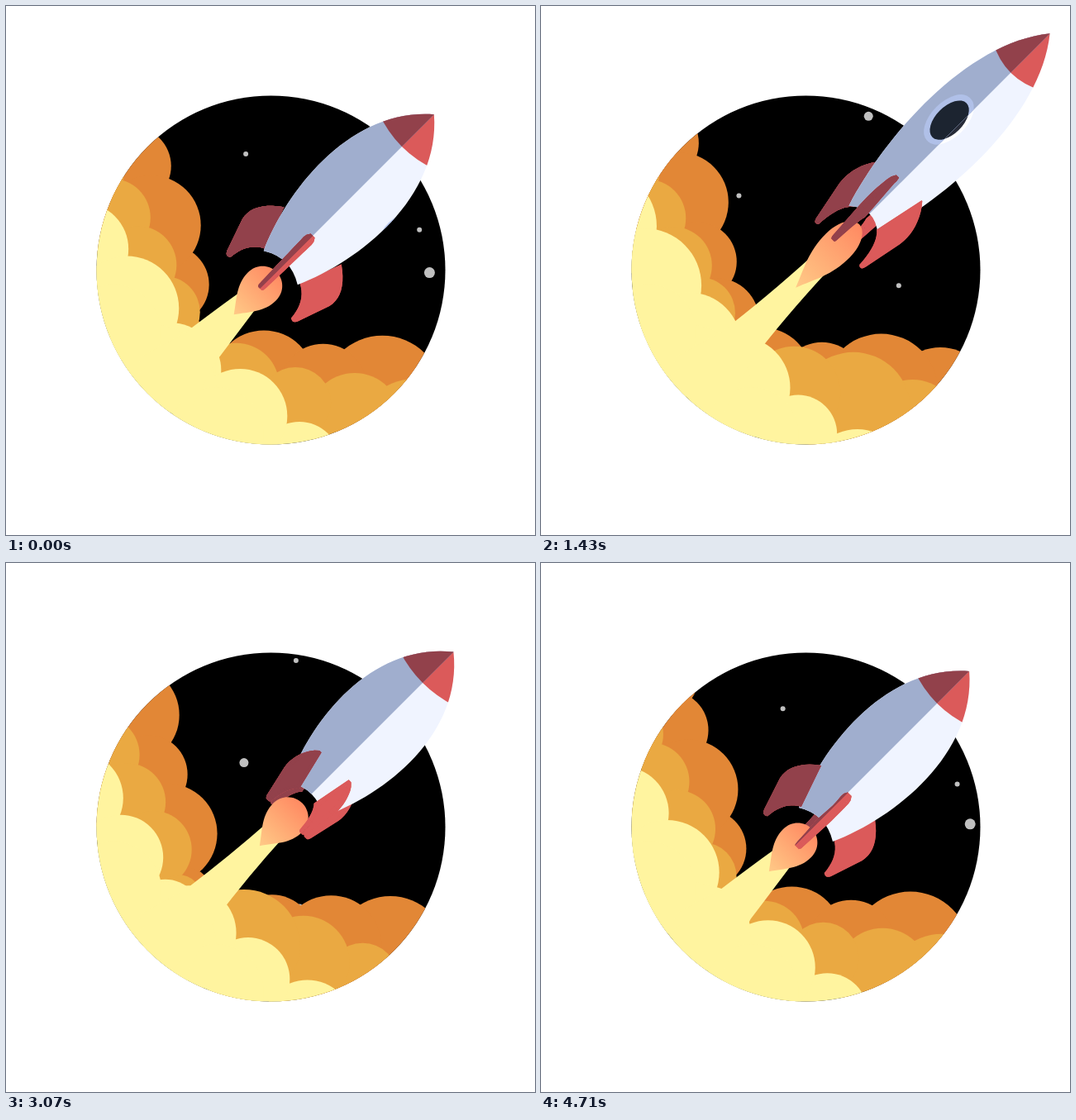
Write an HTML page with a canvas that moves like this. It is 640 px wide and 640 px high and loops after 4780 ms.

```html
<!DOCTYPE html>
<html lang="en">
<head>
<meta charset="utf-8">
<title>Rocket launch</title>
<style>
html, body { margin: 0; width: 100%; height: 100%; overflow: hidden; background: #fff; }
canvas { display: block; width: 640px; height: 640px; }
</style>
</head>
<body>
<canvas id="stage" width="640" height="640"></canvas>
<script>
const ctx = document.getElementById('stage').getContext('2d');
const LOOP = 4.78;
const STEPS = 67;
const TICK = LOOP / STEPS;
const TAU = Math.PI * 2;
const AXIS = 649;          // the rocket flies along x + y = AXIS
const LENGTH = 262.6;

const LIGHT = { body: '#f0f4ff', trim: '#db5a5a', ring: '#ffffff', glass: '#282c38' };
const DARK = { body: '#a0aece', trim: '#92414b', ring: '#b0c0e8', glass: '#1c2430' };
const YELLOW = '#fff49f';

// Turning points of the flight: x of the nose tip and stretch of the hull.
const FLIGHT = [
  { at: 0.88, tip: 463, stretch: 0.81 },
  { at: 1.5, tip: 621, stretch: 1.23 },
  { at: 2.35, tip: 518, stretch: 0.86 },
  { at: 3.6, tip: 556, stretch: 1.02 },
  { at: 4.75, tip: 518, stretch: 1 }
];

// Each cloud layer sends out a steady stream of puffs on both sides of the axis.
// Puff radii swell and shrink along the stream as a sine wave.
const PUFF_SPEED = 120;
const GROW_TIME = 0.7;
const CLOUDS = [
  { color: '#e28736', first: -0.1, x: 300,
    right: { count: 8, y: 452, rise: 0.12, radius: 61, swell: 11, waves: 3, phase: 0 },
    left: { count: 8, y: 447, rise: 0.32, radius: 54, swell: 6.5, waves: 4, phase: -TAU / 4 } },
  { color: '#eaa942', first: 0.18, x: 300,
    right: { count: 8, y: 466, rise: 0.28, radius: 56, swell: 13, waves: 2, phase: 0 },
    left: { count: 10, y: 470, rise: 0.55, radius: 47, swell: 0, waves: 0, phase: 0 } },
  { color: YELLOW, first: 0.32, x: 250,
    right: { count: 8, y: 470, rise: 0.78, radius: 56, swell: 9, waves: 3, phase: 2.47 },
    left: { count: 8, y: 478, rise: 0.75, radius: 60, swell: 9.5, waves: 1, phase: 1.13 } }
];

// Stars drift down-left along lines of constant x + y.
const STARS = [
  { sum: 529.5, r: 5.5, enter: 0.5, x: 457.4, speed: 66 },
  { sum: 884, r: 3, enter: 1.5, x: 563.6, speed: 66 },
  { sum: 469, r: 3, enter: 2.6, x: 367.5, speed: 35.5 },
  { sum: 771, r: 3, enter: 4, x: 537, speed: 47.2 },
  { sum: 835, r: 6.5, enter: 4.3, x: 558, speed: 95 }
];

const wrap = t => (t % LOOP + LOOP) % LOOP;

// -1..1 triangle wave with the period and zeros of a sine
const triangle = angle => Math.asin(Math.sin(angle)) * 4 / TAU;

function flightPose(t) {
  const next = FLIGHT.findIndex(key => key.at > t);
  const b = FLIGHT[Math.max(next, 0)];
  const a = FLIGHT[(Math.max(next, 0) + FLIGHT.length - 1) % FLIGHT.length];
  const k = 0.5 - 0.5 * Math.cos(Math.PI * wrap(t - a.at) / wrap(b.at - a.at));
  const mix = name => a[name] + (b[name] - a[name]) * k;
  return { tip: mix('tip'), stretch: mix('stretch') };
}

function disk(x, y, r) {
  ctx.beginPath();
  ctx.arc(x, y, r, 0, TAU);
  ctx.fill();
}

// Runs a drawing as it is and mirrored across the flight axis.
function bothSides(paint) {
  paint('right');
  ctx.save();
  ctx.transform(0, -1, -1, 0, AXIS, AXIS);
  paint('left');
  ctx.restore();
}

function drawStream(t, cloud, { count, y, rise, radius, swell, waves, phase }) {
  for (let i = 0; i < count; i++) {
    const sinceStart = wrap(t - cloud.first - i * LOOP / count + GROW_TIME);
    const grown = 1 - (1 - Math.min(1, sinceStart / GROW_TIME)) ** 2;
    const travel = (sinceStart - GROW_TIME) * PUFF_SPEED;
    const size = radius + swell * Math.sin(TAU * waves * i / count + phase);
    disk(cloud.x + travel, y + rise * travel, size * grown);
  }
}

function drawClouds(t) {
  for (const cloud of CLOUDS) {
    ctx.fillStyle = cloud.color;
    bothSides(side => drawStream(t, cloud, cloud[side]));
  }
  disk(175, 465, 80);
  bothSides(() => disk(254, 519, 58));
}

function drawPlume(start) {
  ctx.fillStyle = YELLOW;
  ctx.beginPath();
  ctx.moveTo(start, -13);
  ctx.quadraticCurveTo(-60, -17, -125, -26);
  ctx.lineTo(-190, -45);
  ctx.lineTo(-190, 45);
  ctx.lineTo(-125, 25);
  ctx.quadraticCurveTo(-60, 16, start, 13);
  ctx.fill();
}

function drawFlame(top, length, half) {
  const tip = top - length;
  const at = k => tip + length * k;
  const glow = ctx.createLinearGradient(tip, 0, top, 0);
  glow.addColorStop(0, '#ffca87');
  glow.addColorStop(1, '#ff8a62');
  ctx.fillStyle = glow;
  ctx.beginPath();
  ctx.moveTo(tip, 0);
  ctx.bezierCurveTo(at(0.22), -half * 0.45, at(0.38), -half, at(0.66), -half);
  ctx.bezierCurveTo(at(0.87), -half, top, -half * 0.5, top, 0);
  ctx.bezierCurveTo(top, half * 0.5, at(0.87), half, at(0.66), half);
  ctx.bezierCurveTo(at(0.38), half, at(0.22), half * 0.45, tip, 0);
  ctx.fill();
}

// Points of a quadratic curve through start and end.
function curve([x0, y0], [x1, y1], [x2, y2], steps = 10) {
  return Array.from({ length: steps + 1 }, (_, i) => {
    const k = i / steps, j = 1 - k;
    return [j * j * x0 + 2 * j * k * x1 + k * k * x2, j * j * y0 + 2 * j * k * y1 + k * k * y2];
  });
}

// Fin outline: distance along the hull, distance from the axis.
const FIN = [
  ...curve([55, 49], [33, 80], [9, 74.5]),
  ...curve([-31, 60.5], [-38, 57.5], [-34, 52]),
  ...curve([-34, 52], [-7, 50], [3, 30])
];

function finThickness(x) {
  const round = (distance, size) => Math.sqrt(Math.min(1, Math.max(0, distance / size)));
  return (4.5 + (x + 35) / 36) * round(57 - x, 8) * round(x + 38, 5);
}

function fillPolygon(points) {
  ctx.beginPath();
  points.forEach(p => ctx.lineTo(...p));
  ctx.closePath();
  ctx.fill();
}

function drawFin(angle, tone) {
  const swing = triangle(angle);
  const edgeOn = 1 - Math.abs(swing);
  const face = sign => FIN.map(([x, r]) => [x, r * swing + sign * finThickness(x) * edgeOn]);
  const a = face(-1), b = face(1);
  ctx.fillStyle = tone.trim;
  fillPolygon(a);
  fillPolygon(b);
  a.forEach((p, i) => {
    const j = (i + 1) % a.length;
    fillPolygon([p, a[j], b[j], b[i]]);
  });
}

function drawWindow(angle, tone) {
  if (Math.cos(angle) <= 0) return;
  const swing = triangle(angle);
  const narrow = 1 - 0.4 * Math.abs(swing);
  const oval = (offset, rx, ry, color) => {
    ctx.fillStyle = color;
    ctx.beginPath();
    ctx.ellipse(131, 72 * swing + offset, rx, ry * narrow, 0, 0, TAU);
    ctx.fill();
  };
  oval(-2.5, 30, 26, DARK.ring);
  oval(0, 30, 26, tone.ring);
  oval(0, 24, 21, tone.glass);
}

function drawHull(angle, tone) {
  ctx.save();
  ctx.beginPath();
  ctx.moveTo(0, -29);
  ctx.bezierCurveTo(74, -62, 197, -76, LENGTH, 0);
  ctx.bezierCurveTo(197, 76, 74, 62, 0, 29);
  ctx.quadraticCurveTo(18, 0, 0, -29);
  ctx.clip();
  ctx.fillStyle = tone.body;
  ctx.fillRect(-5, -80, 280, 160);
  drawWindow(angle, tone);
  ctx.fillStyle = tone.trim;
  ctx.beginPath();
  ctx.moveTo(217, -50);
  ctx.quadraticCurveTo(198, 0, 217, 50);
  ctx.lineTo(280, 50);
  ctx.lineTo(280, -50);
  ctx.fill();
  ctx.restore();
}

// Paints a part lit, then again in shadow on the upper-left side of the axis.
function shaded(paint) {
  paint(LIGHT);
  ctx.save();
  ctx.beginPath();
  ctx.rect(-150, -150, 500, 150);
  ctx.clip();
  paint(DARK);
  ctx.restore();
}

function drawRocket(t) {
  const { tip, stretch } = flightPose(t);
  const width = 1 - (stretch - 1) * 0.7;
  const base = (tip - AXIS / 2) * Math.SQRT2 - LENGTH * stretch;
  const spin = TAU / 4 - t / LOOP * TAU;
  const fins = [0, 1, 2, 3].map(i => spin + i * TAU / 4);
  const inFront = a => Math.cos(a) > 0.03;
  const flameTop = base - 7;
  const flameLength = 73 + Math.max(0, stretch - 1) * 165;
  const hullSpace = paint => {
    ctx.save();
    ctx.translate(base, 0);
    ctx.scale(stretch, width);
    paint();
    ctx.restore();
  };

  ctx.save();
  ctx.translate(AXIS / 2, AXIS / 2);
  ctx.rotate(-TAU / 8);
  drawPlume(flameTop - flameLength * 0.6);
  hullSpace(() => fins.filter(a => !inFront(a)).forEach(a => shaded(tone => drawFin(a, tone))));
  drawFlame(flameTop, flameLength, 24 * width);
  hullSpace(() => {
    shaded(tone => drawHull(spin, tone));
    fins.filter(inFront).sort((a, b) => Math.cos(a) - Math.cos(b))
      .forEach(a => shaded(tone => drawFin(a, tone)));
  });
  ctx.restore();
}

function drawStars(t) {
  ctx.fillStyle = '#c0c0c0';
  for (const star of STARS) {
    const x = star.x - star.speed * wrap(t - star.enter);
    disk(x, star.sum - x, star.r);
  }
}

function draw(t) {
  ctx.fillStyle = '#fff';
  ctx.fillRect(0, 0, 640, 640);
  ctx.save();
  ctx.beginPath();
  ctx.arc(320.5, 319.5, 211, 0, TAU);
  ctx.clip();
  ctx.fillStyle = '#000';
  ctx.fillRect(0, 0, 640, 640);
  drawStars(t);
  drawClouds(t);
  ctx.restore();
  drawRocket(t);
}

const start = performance.now();
function frame() {
  const t = (performance.now() - start) / 1000 % LOOP;
  draw(Math.floor(t / TICK + 0.03) % STEPS * TICK);
  requestAnimationFrame(frame);
}
frame();
</script>
</body>
</html>
```
